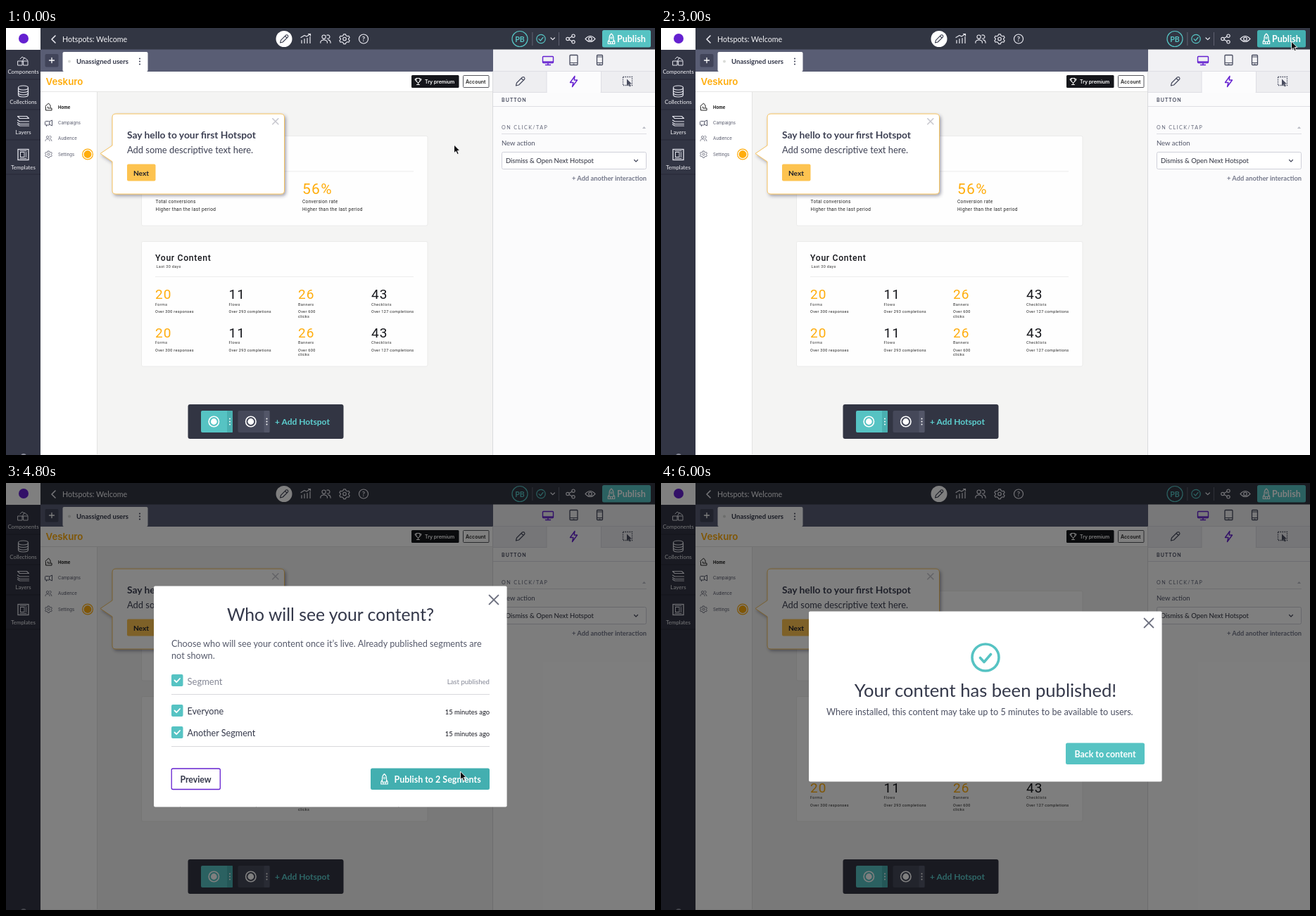
Recreate the animation shown at these times as an HTML page. Size 922 by 607 pixels, loop 10000 ms.

```html
<!DOCTYPE html>
<html lang="en">
<head>
<meta charset="utf-8">
<title>Publish hotspots</title>
<style>
html, body { margin: 0; width: 100%; height: 100%; overflow: hidden; }
svg { display: block; width: 100vw; height: 100vh; }
text { font-family: Lato, sans-serif; white-space: pre; }
.page { font-family: Roboto, sans-serif; letter-spacing: .35px; }
.site { font-family: Inter, sans-serif; }
</style>
</head>
<body>
<svg id="stage" viewBox="0 0 922 607"></svg>
<script>
const TEAL = '#56c3c3', TEAL_HOVER = '#43afb0', AMBER = '#ffad0d', INK = '#34384a', PURPLE = '#6420d0';

const rect = (x, y, x2, y2, fill, more = '') =>
  `<rect x="${x}" y="${y}" width="${x2 - x}" height="${y2 - y}" fill="${fill}" ${more}/>`;
const text = (x, y, size, fill, str, more = '') =>
  `<text x="${x}" y="${y}" font-size="${size}" fill="${fill}" ${more}>${str}</text>`;
const line = (d, color, w = 1.2, more = '') =>
  `<path d="${d}" fill="none" stroke="${color}" stroke-width="${w}" stroke-linecap="round" stroke-linejoin="round" ${more}/>`;
const dot = (x, y, r, fill, more = '') => `<circle cx="${x}" cy="${y}" r="${r}" fill="${fill}" ${more}/>`;
const ring = (x, y, r, color, w = 1.2) => dot(x, y, r, 'none', `stroke="${color}" stroke-width="${w}"`);
const at = (x, y, body, scale = 1) => `<g transform="translate(${x} ${y}) scale(${scale})">${body}</g>`;
const cross = (x, y, r, color, w) => line(`M${x - r} ${y - r}l${2 * r} ${2 * r}m0 ${-2 * r}l${-2 * r} ${2 * r}`, color, w);
const dots = (x, y, gap, r, color) => [-1, 0, 1].map(i => dot(x, y + i * gap, r, color)).join('');
const BOLD = 'font-weight="700"', MID = 'text-anchor="middle"', END = 'text-anchor="end"';

// Icons, each centred on 0,0
const pencil = c => line('M-6 6L-5 2 3 -6Q5 -7 6 -5.5T6 -3L-2 5ZM1.5 -4.5L4.5 -1.5', c);
const people = c => ring(-2.5, -3, 2.8, c) + line('M-7.5 6V4Q-6 1.5 -2.5 1.5T2.5 4V6M2 -5.5A2.8 2.8 0 1 1 2.5 -.5M4 1.5Q7.5 2 7.5 6', c);
const gear = c => ring(0, 0, 2.4, c) +
  line('M-1.5 -7h3l.7 2 2 1 2-.5 1.3 2.5-1.5 1.5v1.5l1.5 1.5-1.3 2.5-2-.5-2 1-.7 2h-3l-.7-2-2-1-2 .5-1.3-2.5 1.5-1.5V-.5l-1.5-1.5 1.3-2.5 2 .5 2-1Z', c);
const rocket = c => line('M0 -7.5Q3 -5 3 -1V4H-3V-1Q-3 -5 0 -7.5ZM-3 1L-4.7 3.5V7H4.7V3.5L3 1M-1.5 4V7M1.5 4V7', c, 1.2) + ring(0, -1.5, 1.2, c, 1);
const bolt = c => line('M1.5 -7.5L-5 1.5H-.5L-2 7.5 5 -2H.7Z', c, 1.4);
const horn = c => rect(-5, -2.5, 1, 3, 'none', `stroke="${c}" rx="1"`) + line('M1 -2L5 -4V4L1 2M-3 3V4.5', c, 1);

function topBar() {
  const w = '#e9e9f0';
  return rect(0, 0, 49, 31, '#fff') + dot(25, 15, 7, PURPLE) +
    rect(49, 0, 922, 30.5, '#323643') +
    line('M70 11L65 16 70 21', w, 1.6) +
    text(80, 20, 10.7, '#f3f3f6', 'Hotspots: Welcome') +
    dot(395, 15.5, 11.5, '#fff') + at(395, 15.5, pencil(INK), .9) +
    at(426, 15.5, line('M-6 6V2M-2 6V0M2 6V-1M6 6V-3M-7 -2L-2 -5 1 -3.5 6.5 -7M3.5 -7H6.5V-4.5', w)) +
    at(454, 15.5, people(w), .95) + at(481, 15.5, gear(w), .95) +
    ring(508, 15.5, 6.5, w) + text(508, 19, 9.5, w, '?', `${MID} ${BOLD}`) +
    ring(730, 15.5, 11, TEAL, 1.2) + text(730, 19.5, 10.6, TEAL, 'PB', `${MID} ${BOLD}`) +
    rect(747.5, 6, 748.3, 25, '#6b6f7e') + rect(785, 6, 785.8, 25, '#6b6f7e') +
    ring(760, 15.5, 6.2, TEAL) + line('M757 15.7L759.3 18 763 13.5', TEAL) +
    line('M774 14L776.7 16.7 779.4 14', w) +
    at(802, 15.5, ring(-4, 0, 2.2, w) + ring(4, -4.3, 2.2, w) + ring(4, 4.3, 2.2, w) + line('M-2 -1L2 -3.3M-2 1L2 3.3', w)) +
    line('M823 15.5Q830 7.5 837 15.5Q830 23.5 823 15.5Z', w) + ring(830, 15.5, 2.3, w) +
    rect(847, 3, 916, 27.5, TEAL, 'rx="2.5" id="publish"') + at(860, 15.5, rocket('#fff')) +
    text(868, 20, 12.5, '#fff', 'Publish', BOLD);
}

function rail() {
  const c = '#e3e4ec';
  const names = [['Components', 65.2], ['Collections', 108.2], ['Layers', 151], ['Templates', 201]];
  return rect(0, 31, 49, 607, '#323544') +
    [73, 116, 159, 208].map(y => rect(0, y - .5, 49, y + .5, '#262936')).join('') +
    names.map(([n, y]) => text(24.5, y, 7.9, '#f1f1f5', n, MID)).join('') +
    at(24, 47, line('M-7 0H-1V6H-7ZM-1 1L2 -5 7 -1M1 0H7V6H1ZM-4 -3L-1 -6 2 -4', c, 1)) +
    at(24.5, 90, line('M-7 -5V5Q-7 8 0 8T7 5V-5M-7 -5Q-7 -8 0 -8T7 -5Q7 -2 0 -2T-7 -5M-7 -1.5Q-7 1.5 0 1.5T7 -1.5M-7 2Q-7 5 0 5T7 2', c)) +
    at(24.5, 132, line('M-8 -6.5H5L8 -3.5H-5ZM-8 -1L-5 1H8M-8 2.5L-5 4.5H8M-8 5L-5 7H8', c)) +
    at(24.5, 180, rect(-7.5, -7.5, 7.5, 7.5, 'none', `stroke="${c}" stroke-width="1.3"`) +
      rect(-4, -3.5, 1.5, 3.5, 'none', `stroke="${c}"`) + line('M4 -3.5V3.5M-4.5 5.5H4.5M-4.5 -5.5H4.5', c, .9)) +
    dot(25, 609, 4, '#8b8e9b');
}

function site() {
  const nav = [['Home', 114.6], ['Campaigns', 136.9], ['Audience', 159.1], ['Settings', 181.6]];
  const grey = '#55586a';
  const icons = [
    at(60.5, 112, line('M-4.5 -1L0 -5 2.5 -2V1M-4 0V5H4.5V2H-1V0', '#222', 1)),
    at(60.5, 135, horn(grey)), at(60.5, 157, people(grey), .6), at(60.5, 179.5, gear(grey), .65)];
  return rect(49, 30, 692, 62, '#595d74') + rect(55.5, 37, 74.5, 55.5, '#414459', 'rx="2"') +
    line('M61.5 46H68.5M65 42.5V49.5', '#fff', 1.3) +
    rect(80.5, 34, 201.5, 62, '#fff', 'rx="2"') + dot(90, 47.5, 2, '#d9dbd8') +
    text(100, 51, 9.6, INK, 'Unassigned users', BOLD) + dots(190, 47.5, 4, 1.1, '#4b4e62') +
    rect(49, 62, 692, 607, '#f4f4f3') + rect(49, 62, 692, 90, '#fff') + rect(49, 90, 692, 91, '#e6e6e5') +
    rect(49, 91, 129, 606, '#fff') + rect(129, 91, 130, 606, '#e4e4e3') +
    text(56.5, 81, 13.3, AMBER, 'Veskuro', 'class="site" font-weight="600"') +
    rect(576, 67, 643.5, 85, '#15161b', 'rx="1.5"') +
    at(585.5, 76, line('M-2.5 -4.5H2.5V-1Q2.5 1.5 0 1.5T-2.5 -1ZM-2.5 -3.5H-4.5Q-4.5 -.5 -2.3 -.3M2.5 -3.5H4.5Q4.5 -.5 2.3 -.3M0 1.5V4M-2 4.5H2', '#fff', 1)) +
    text(595, 78.6, 6.9, '#fff', 'Try premium', 'class="site" font-weight="600"') +
    rect(649.5, 67.5, 686, 84.5, '#fff', 'rx="1" stroke="#55565c"') +
    text(653, 78.6, 7, '#222', 'Account', 'class="site" font-weight="600"') +
    icons.join('') +
    nav.map(([n, y], i) => text(74, y, 6, i ? grey : '#111', n, `class="site" ${i ? '' : BOLD}`)).join('');
}

function cards() {
  const page = (x, y, size, fill, s, more = '') => text(x, y, size, fill, s, `class="page" ${more}`);
  const stats = [
    [212, '20', 'Forms', 'Over 300 responses'], [316.5, '11', 'Flows', 'Over 293 completions'],
    [415, '26', 'Banners', 'Over 600'], [519, '43', 'Checklists', 'Over 127 completions']];
  const edge = 'stroke="#ebebea" rx="2"';
  const row = y => stats.map(([x, n, label, note], i) =>
    page(x, y, 19, i % 2 ? '#15161b' : AMBER, n, 'style="letter-spacing:1px"') +
    page(x, y + 9.5, 5.5, '#333', label) + page(x, y + 20, 5.5, '#222', note) +
    (i === 2 ? page(x, y + 26.5, 5.5, '#222', 'clicks') : '')).join('');
  return rect(192.5, 153.5, 599, 281, '#fefefe', edge) + rect(212, 203.5, 579, 204.3, '#e8e8e8') +
    page(421, 236, 21, AMBER, '56%', 'style="letter-spacing:1.3px"') +
    [[212.5, 'Total conversions'], [421, 'Conversion rate']].map(([x, s]) =>
      page(x, 248.8, 6.5, '#222', s) + page(x, 259.8, 6.5, '#222', 'Higher than the last period')).join('') +
    rect(192.5, 303.5, 599, 481, '#fefefe', edge) + rect(212, 353.3, 579, 354.1, '#e8e8e8') +
    page(212, 331, 12.2, '#15161b', 'Your Content', 'font-weight="500" style="letter-spacing:.7px"') +
    page(213.5, 341, 5.5, '#333', 'Last 30 days') + row(385) + row(439.5);
}

function hotspot() {
  return ring(116, 179.5, 7.4, AMBER, 1.2) + dot(116, 179.5, 5.4, AMBER) +
    `<path d="M156 122H390Q395.5 122 395.5 127V231Q395.5 236 390 236H156Q151 236 151 231V190L134 178.5 151 167V127Q151 122 156 122Z" fill="#fff" stroke="#f5c15f" filter="url(#shadow)"/>` +
    cross(382.8, 132.8, 4, '#c8c8cf', 1.6) +
    text(172, 156.5, 13.8, '#3d4053', 'Say hello to your first Hotspot', BOLD) +
    text(172, 177.8, 12.9, '#3d4053', 'Add some descriptive text here.') +
    rect(172, 193.5, 212.5, 217.5, '#fdc350', 'rx="2"') + text(192, 210, 10.2, '#20222b', 'Next', `${MID} ${BOLD}`);
}

function dock() {
  return rect(258.5, 535, 479.5, 584, '#323543', 'rx="3"') +
    [[277, TEAL, '#49afb0'], [329.5, '#454859', '#535668']].map(([x, c, tab]) =>
      rect(x, 544, x + 45, 575, c, 'rx="2"') + rect(x + 37, 544, x + 45, 575, tab, 'rx="1"') +
      ring(x + 18.3, 559.5, 7.2, '#fff', 1.6) + dot(x + 18.3, 559.5, 4.4, '#fff') +
      dots(x + 41, 559.5, 4, 1, '#fff')).join('') +
    text(382, 564, 12, '#5dd0d0', '+ Add Hotspot', BOLD);
}

function panel() {
  const g = '#484c5f';
  return rect(692, 30, 922, 607, '#fbfbfc') + rect(692, 30, 922, 61, '#f1f1f4') +
    rect(692, 61, 922, 92, '#eeeef1') + rect(768, 61, 845, 92, '#fcfcfd') +
    line('M692 61.5H922M692 91.5H768M845 91.5H922M768 61.5V91.5M845.5 61.5V91.5M692 111.5H922', '#dedee4', 1) +
    rect(691, 62, 692, 607, '#d9dadd') +
    at(770, 46, rect(-7.5, -5.5, 7.5, 3.5, 'none', `stroke="${PURPLE}" stroke-width="1.4" rx="1"`) + line('M-7 2H7M0 4V6M-3.5 6.5H3.5', PURPLE, 1.4)) +
    at(806.5, 45.5, rect(-5.5, -7, 5.5, 7, 'none', `stroke="${g}" stroke-width="1.3" rx="1"`) + line('M-5 4H5M-.5 5.7H.5', g, 1)) +
    at(843.5, 45.5, rect(-4, -7, 4, 7, 'none', `stroke="${g}" stroke-width="1.3" rx="1"`) + line('M-4 -4.5H4M-4 4H4M-.5 5.7H.5', g, 1)) +
    at(730.5, 76, pencil(g)) + at(806.5, 76, bolt(PURPLE)) +
    at(883, 75.5, rect(-6.5, -6, 6.5, 6, 'none', `stroke="${g}" stroke-width="1.3" stroke-dasharray="1.6 1.4"`) +
      `<path d="M-1 -3V6.5L1.3 4.6 3 8 4.5 7.2 3 4H6Z" fill="${g}"/>`) +
    text(704, 105, 7, g, 'BUTTON', `${BOLD} letter-spacing="1.1"`) +
    text(704, 144.3, 7.2, '#64687a', 'ON CLICK/TAP', 'letter-spacing="1.4"') +
    `<path d="M904 143L906.5 140 909 143Z" fill="#b9bbc4"/>` + rect(704, 150, 910, 151, '#dddde3') +
    text(704, 167, 9.5, '#505467', 'New action') +
    rect(704.5, 176.5, 909.5, 200.5, '#fff', 'rx="2" stroke="#cfd0d9"') +
    text(710, 192.4, 9.45, '#2b2e3c', 'Dismiss &amp; Open Next Hotspot') +
    line('M892.5 187.5L895 190 897.5 187.5', g) +
    text(910, 217, 9.3, '#74788a', '+ Add another interaction', `${END} ${BOLD}`);
}

const modal = (id, top, bottom, closeY, body) => `<g id="${id}">` +
  rect(210, top, 711.6, bottom, '#fff', 'rx="2"') + cross(693, closeY, 6.4, '#6e7180', 2) + body + '</g>';

function segments() {
  const tick = y => rect(235, y, 251.5, y + 17, TEAL, 'rx="2"') + line(`M239.5 ${y + 8.5}l2.7 2.7 4.8 -5.2`, '#fff', 1.8);
  const item = (y, name) => text(257.5, y, 12.6, INK, name) + text(687, y - .5, 9.4, '#15161f', '15 minutes ago', END);
  return text(461, 195.8, 24.7, INK, 'Who will see your content?', MID) +
    text(235, 232.5, 12.7, '#565a6b', 'Choose who will see your content once it’s live. Already published segments are') +
    text(235, 249.5, 12.7, '#565a6b', 'not shown.') +
    tick(272) + tick(315) + tick(346) +
    text(257.5, 286.5, 13, '#858896', 'Segment') + text(687, 285.5, 9.6, '#858896', 'Last published', END) +
    item(329.2, 'Everyone') + item(360.2, 'Another Segment') +
    rect(235, 300, 687, 301, '#d8d8dc') + rect(235, 374, 687, 375, '#d8d8dc') +
    rect(235.2, 406, 304.3, 435.5, '#fff', `rx="2" stroke="${PURPLE}" stroke-width="1.3"`) +
    text(269.5, 425.8, 12.25, INK, 'Preview', `${MID} ${BOLD}`) +
    rect(518, 405.5, 687, 436, TEAL, 'rx="2.5" id="confirm"') + at(537.5, 421, rocket('#fff')) +
    text(551.5, 426, 12.5, '#fff', 'Publish to 2 Segments', BOLD);
}

const spinner = () => ring(461, 293.3, 28, '#e9e9ed', 10) +
  line('M464.9 265.6A28 28 0 0 1 488.7 289.4', '#5f0fe0', 9.6, 'id="arc"') +
  text(461, 345.5, 11.4, '#3d4053', 'Publishing ...', MID);

const success = () => ring(461, 248, 19, TEAL, 3.6) + line('M453.5 248.5L459 254.5 468.5 243.5', TEAL, 3.6) +
  text(461, 303.8, 25.6, INK, 'Your content has been published!', MID) +
  text(235, 329.5, 12.65, '#4b4f61', 'Where installed, this content may take up to 5 minutes to be available to users.') +
  rect(575, 369.5, 687, 400, TEAL, 'rx="2.5"') + text(631, 389.8, 12.4, '#fff', 'Back to content', `${MID} ${BOLD}`);

document.getElementById('stage').innerHTML =
  '<defs><filter id="shadow" x="-10%" y="-10%" width="125%" height="130%"><feDropShadow dx="2" dy="2.5" stdDeviation="2.2" flood-color="#30334a" flood-opacity=".42"/></filter></defs>' +
  site() + cards() + hotspot() + dock() + panel() + topBar() + rail() +
  rect(0, 0, 922, 607, '#000', 'fill-opacity=".5" id="shade"') +
  modal('segments', 146.5, 460.6, 166, segments()) +
  modal('spinner', 211.5, 396, 229, spinner()) +
  modal('success', 182.5, 424.6, 199, success()) +
  '<path id="cursor" d="M0 0V11.8L2.7 9.3 4.7 13.6 6.7 12.7 4.8 8.5H8.4Z" fill="#0b0b0e" stroke="#fff" stroke-width=".9" stroke-linejoin="round"/>';

const LOOP = 10000, STEP = 200;
const el = id => document.getElementById(id);
const [publish, confirmButton, shade, arc, cursor] = ['publish', 'confirm', 'shade', 'arc', 'cursor'].map(el);
const windows = { segments: [3200, 5200], spinner: [5200, 5800], success: [5800, LOOP] };

// Pointer stops: time, x, y
const stops = [[0, 636.5, 166], [2000, 711.5, 115], [2200, 895.5, 19], [3800, 738, 300], [4000, 668, 396], [4200, 645.5, 410]];

const within = (t, [from, to]) => t >= from && t < to;
const show = (node, on) => node.setAttribute('display', on ? 'inline' : 'none');

function render(ms) {
  const t = Math.floor((ms % LOOP) / STEP) * STEP;
  for (const id in windows) show(el(id), within(t, windows[id]));
  show(shade, t >= 3200);
  publish.setAttribute('fill', within(t, [2200, 4000]) ? TEAL_HOVER : TEAL);
  confirmButton.setAttribute('fill', t >= 4200 ? TEAL_HOVER : TEAL);
  arc.setAttribute('transform', `rotate(${(t - 5200) * .36} 461 293.3)`);
  const [, x, y] = stops.filter(s => s[0] <= t).pop();
  cursor.setAttribute('transform', `translate(${x} ${y})`);
  show(cursor, t < 6000);
}

const start = performance.now();
(function tick() {
  render(performance.now() - start);
  requestAnimationFrame(tick);
})();
</script>
</body>
</html>
```
